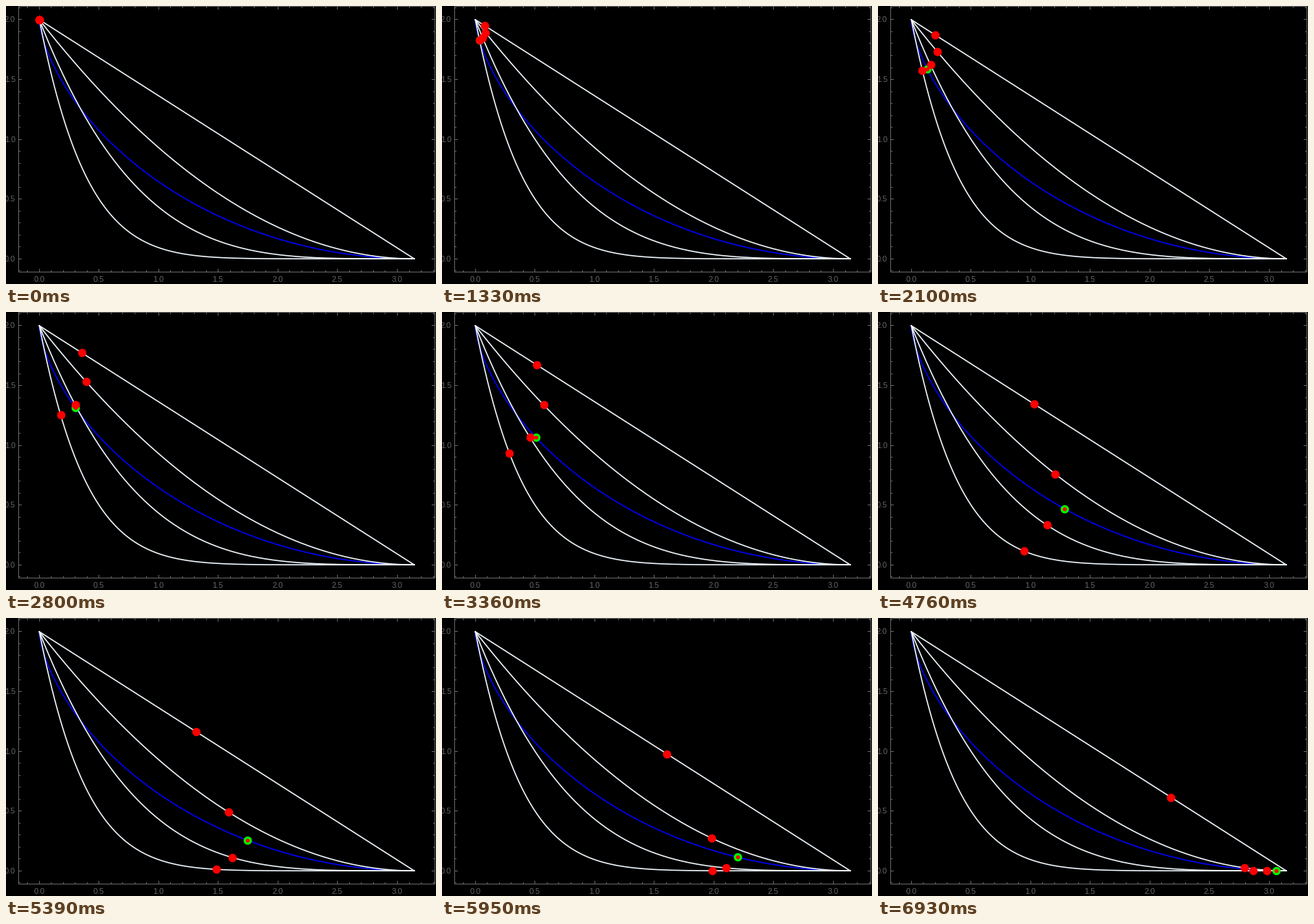
Recreate the animation shown at these times as a matplotlib script. Size 595 by 384 pixels, loop 7000 ms.

```python
import numpy as np
import matplotlib.pyplot as plt
from matplotlib.animation import FuncAnimation

W, H, DPI = 595, 384, 100
PX = 72 / DPI                         # points per pixel
X0, Y0, UNIT = 46.15, 349.2, 165.12   # data origin and scale in pixels
LEFT, RIGHT, TOP, BOTTOM = 17.5, 593.5, 0.5, 367.5
GRAV, DT, STEPS = 9.8, 0.01, 100
POWERS = (8, 4, 2, 1)
GREY = "#666666"

plt.rcParams["font.family"] = "Liberation Sans"
fig = plt.figure(figsize=(W / DPI, H / DPI), dpi=DPI, facecolor="black")
ax = fig.add_axes([0, 0, 1, 1])
ax.set_xlim(0, W)
ax.set_ylim(H, 0)
ax.axis("off")


def to_px(x, y):
    return X0 + UNIT * np.asarray(x), Y0 - UNIT * np.asarray(y)


def cycloid(a):
    return a - np.sin(a), 1 + np.cos(a)


def power_curve(x, n):
    return 2 * (1 - x / np.pi) ** n


def slide(n):
    """x position at every step for a bead released on a power curve."""
    u = np.linspace(0, np.sqrt(np.pi), 6001)
    mid = (u[1:] + u[:-1]) / 2        # x = u**2 removes the singular start
    x = mid ** 2
    slope = -2 * n / np.pi * (1 - x / np.pi) ** (n - 1)
    speed = np.sqrt(2 * GRAV * (2 - power_curve(x, n)))
    dt = 2 * mid * np.sqrt(1 + slope ** 2) / speed * np.diff(u)
    times = np.concatenate(([0], np.cumsum(dt)))
    return np.interp(np.arange(STEPS) * DT, times, u) ** 2


def line(xs, ys):
    """One-pixel line through pixel centres."""
    ax.plot(xs, ys, color=GREY, lw=PX, snap=False,
            solid_capstyle="butt", solid_joinstyle="miter")


def label(x, y, value, align):
    ax.text(x, y, f"{value:.1f}", color=GREY, fontsize=11 * PX,
            ha=align, va="center_baseline")


def draw_frame():
    line([LEFT, RIGHT, RIGHT, LEFT, LEFT], [TOP, TOP, BOTTOM, BOTTOM, TOP])
    for i in range(-1, 34):
        x = np.floor(to_px(i / 10, 0)[0]) + 0.5
        size = 2.5 if i % 5 else 4.5
        line([x, x], [BOTTOM, BOTTOM - size])
        line([x, x], [TOP, TOP + size])
        if i % 5 == 0:
            label(x - 0.5, 377, i / 10, "center")
    for i in range(-1, 22):
        y = np.floor(to_px(0, i / 10)[1]) + 0.5
        size = 2.5 if i % 5 else 4.5
        line([LEFT, LEFT + size], [y, y])
        line([RIGHT, RIGHT - size], [y, y])
        if i % 5 == 0:
            label(13, y - 0.7, i / 10, "right")


def draw_curves():
    ax.plot(*to_px(*cycloid(np.linspace(0, np.pi, 300))),
            color="#0000ff", lw=1.6 * PX)
    x = np.linspace(0, np.pi, 300)
    for n in POWERS:
        ax.plot(*to_px(x, power_curve(x, n)), color="#f0f8ff", lw=1.6 * PX)


def bead(color, size):
    return ax.plot([], [], "o", color=color, ms=size * PX, mew=0)[0]


draw_frame()
draw_curves()
paths = [(n, slide(n)) for n in POWERS]
ring = bead("#00ff00", 11.5)
core = bead("#ff0000", 5.5)
beads = bead("#ff0000", 11.5)


def update(i):
    x, y = to_px(*cycloid(np.sqrt(GRAV) * i * DT))
    ring.set_data([x], [y])
    core.set_data([x], [y])
    xs = np.array([p[i] for _, p in paths])
    ys = [power_curve(p[i], n) for n, p in paths]
    beads.set_data(*to_px(xs, ys))
    return ring, core, beads


anim = FuncAnimation(fig, update, frames=STEPS, interval=70, repeat=True,
                     repeat_delay=0)
plt.show()
```
